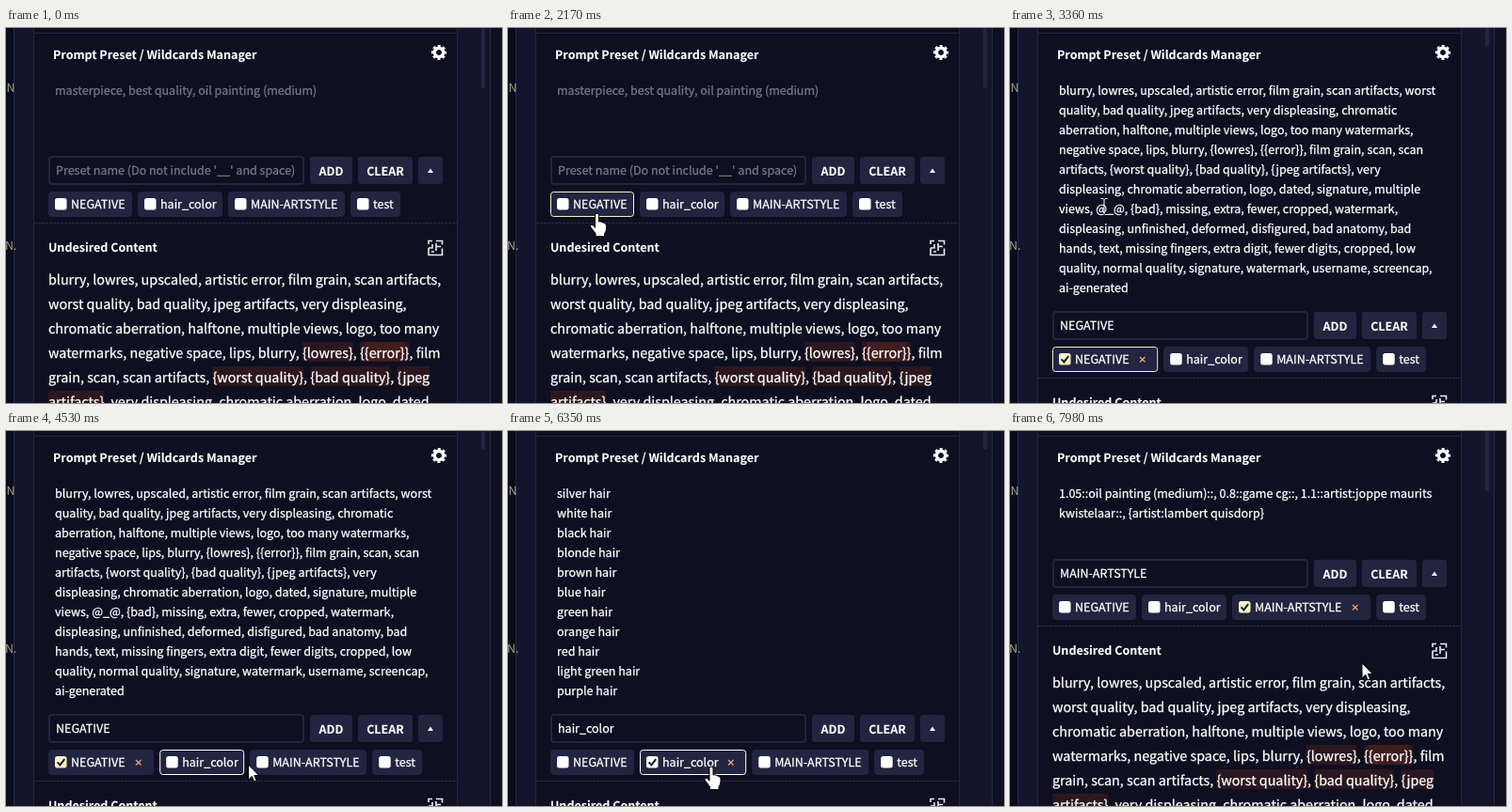
Write an HTML page that moves like this. It is 527x399 px and loops after 8 s.

```html
<!DOCTYPE html>
<html lang="en">
<head>
<meta charset="utf-8">
<title>Preset manager</title>
<style>
  html, body { margin: 0; width: 100%; height: 100%; overflow: hidden; background: #0e0f21; }
  svg { display: block; width: 527px; height: 399px; }
  text {
    font: 12.52px "Noto Sans CJK SC", "Noto Sans CJK JP", "Noto Sans CJK KR", "Open Sans", sans-serif;
    color: #fff; fill: currentColor; stroke: currentColor; stroke-width: 0.28px;
    text-rendering: geometricPrecision; white-space: pre;
  }
  .head { font-weight: 700; stroke-width: 0.1px; }
  .body { font-size: 14.32px; }
  .hint { color: #777885; }
  .side { color: #a3a18c; stroke: none; }
</style>
</head>
<body>
<svg id="stage" viewBox="0 0 527 399"></svg>
<script>
const LOOP = 8000, STEP = 70, CREAM = '#f5f3c2', LINE = '#22253f', PAPER = '#0e0f21';
const stage = document.getElementById('stage');

function el(tag, attrs, parent = stage) {
  const node = document.createElementNS('http://www.w3.org/2000/svg', tag);
  set(node, attrs);
  parent.append(node);
  return node;
}
function set(node, attrs) {
  for (const key in attrs) node.setAttribute(key, attrs[key]);
}
function rect(x, y, width, height, fill, parent, rx = 0) {
  return el('rect', { x, y, width, height, fill, rx }, parent);
}
function text(x, y, str, cls = '', parent = stage) {
  const node = el('text', { x, y, class: cls }, parent);
  node.textContent = str;
  return node;
}
function show(node, on) {
  node.style.display = on ? '' : 'none';
}

// Page frame
rect(0, 0, 527, 399, '#0a0c1a');
rect(8, 0, 507, 399, '#272a45');
rect(9, 0, 505, 399, '#13152c');
rect(515, 0, 12, 399, PAPER);
rect(29, 0, 451, 399, LINE);
rect(30, 0, 449, 399, PAPER);
rect(30, 5, 449, 1, LINE);
const thumb = rect(505, 0, 4, 64, LINE, stage, 2);
text(0.5, 68, 'N', 'side');
text(-1, 236, 'N.', 'side');

text(50, 33, 'Prompt Preset / Wildcards Manager', 'head');
const gear = el('g', { transform: 'translate(460 26)', fill: 'none', stroke: '#fff' });
el('circle', { r: 4.7, 'stroke-width': 3.4 }, gear);
el('circle', { r: 6.8, 'stroke-width': 2.6, 'stroke-dasharray': '2.9 2.44', 'stroke-dashoffset': 1.45 }, gear);

// Prompt contents for each preset
const hairs = 'silver,white,black,blonde,brown,blue,green,orange,red,light green,purple';
const rows = {
  none: ['masterpiece, best quality, oil painting (medium)'],
  NEGATIVE: [
    'blurry, lowres, upscaled, artistic error, film grain, scan artifacts, worst',
    'quality, bad quality, jpeg artifacts, very displeasing, chromatic',
    'aberration, halftone, multiple views, logo, too many watermarks,',
    'negative space, lips, blurry, {lowres}, {{error}}, film grain, scan, scan',
    'artifacts, {worst quality}, {bad quality}, {jpeg artifacts}, very',
    'displeasing, chromatic aberration, logo, dated, signature, multiple',
    'views, @_@, {bad}, missing, extra, fewer, cropped, watermark,',
    'displeasing, unfinished, deformed, disfigured, bad anatomy, bad',
    'hands, text, missing fingers, extra digit, fewer digits, cropped, low',
    'quality, normal quality, signature, watermark, username, screencap,',
    'ai-generated'
  ],
  hair_color: hairs.split(',').map(c => c + ' hair'),
  'MAIN-ARTSTYLE': [
    '1.05::oil painting (medium)::, 0.8::game cg::, 1.1::artist:joppe maurits',
    'kwistelaar::, {artist:lambert quisdorp}'
  ]
};
const ROW = 21, MIN_AREA = 66;
const prompts = {};
for (const name in rows) {
  prompts[name] = el('g', {});
  rows[name].forEach((row, i) => text(52, 71 + ROW * i, row, name === 'none' ? 'hint' : '', prompts[name]));
}

// Everything below the prompt moves down when it grows
const lower = el('g', {});
set(rect(46, 137, 270, 29, PAPER, lower, 3), { stroke: LINE, 'stroke-width': 2 });
const field = text(53, 156.3, '', '', lower);
[[323, 45, 'ADD'], [374, 58, 'CLEAR'], [438, 26, '']].forEach(([x, w, label]) => {
  rect(x, 137, w, 29, LINE, lower, 3);
  set(text(x + w / 2, 156.5, label, 'head', lower), { 'text-anchor': 'middle' });
});
el('path', { d: 'M448 154l3-4.5 3 4.5z', fill: '#fff' }, lower);
el('path', { d: 'M30 207.5H479', stroke: '#2b2e4b', 'stroke-dasharray': '3 1' }, lower);

text(45, 238, 'Undesired Content', 'head', lower);
el('path', {
  d: 'M449 230v-3.5h4M457 226.5h6.5v4M449 234v7.5h14.5v-7M453 230v4h-4M457 237v-4.5h5M457 229v3.5M452 238h3',
  fill: 'none', stroke: '#e8e8ee', 'stroke-width': 1.6
}, lower);

// Body text, with a tint behind every braced part
function tint(line, y, from, to) {
  const x = line.getStartPositionOfChar(from).x;
  const bar = rect(x, y - 17, line.getEndPositionOfChar(to - 1).x - x, 21, '#6b2a1c', undefined, 1);
  bar.setAttribute('opacity', 0.32);
  lower.insertBefore(bar, line);
}
[
  'blurry, lowres, upscaled, artistic error, film grain, scan artifacts,',
  'worst quality, bad quality, jpeg artifacts, very displeasing,',
  'chromatic aberration, halftone, multiple views, logo, too many',
  'watermarks, negative space, lips, blurry, {lowres}, {{error}}, film',
  'grain, scan, scan artifacts, {worst quality}, {bad quality}, {jpeg',
  'artifacts}, very displeasing, chromatic aberration, logo, dated,'
].forEach((row, i) => {
  const y = 273 + 26 * i;
  const line = text(45, y, row, 'body', lower);
  for (const { 0: part, index } of row.matchAll(/\{+[\w ]+\}*|^\w+\}/g)) {
    tint(line, y, index, index + part.length);
    if (part.startsWith('{{')) tint(line, y, index + 1, index + part.length - 1);
  }
});

// Preset chips
const EXTRA = 23.2;
const chips = Object.entries({ NEGATIVE: 89, hair_color: 90, 'MAIN-ARTSTYLE': 124, test: 53 }).map(([name, w]) => {
  const group = el('g', {}, lower);
  const back = el('rect', { x: 0.5, y: 174.5, height: 26, rx: 3, fill: LINE }, group);
  const box = rect(7, 181, 12.5, 12.5, '#fff', group, 2.5);
  const check = el('path', { d: 'M9.6 187.4l2.8 3 4.8-6.2', fill: 'none', stroke: '#15172e', 'stroke-width': 2 }, group);
  text(24, 192, name, '', group);
  const cross = el('path', { d: `M${w + 4} 185l5.5 5.5m0-5.5l-5.5 5.5`, stroke: '#f0a070', 'stroke-width': 1.3 }, group);
  return { name, w, group, back, box, check, cross, accent: name === 'hair_color' ? '#fff' : CREAM };
});

// Pointer
const spot = el('circle', { r: 11.5, fill: '#ffee00', opacity: 0.5 });
const pointer = el('g', { fill: '#fff', stroke: '#000', 'stroke-linejoin': 'round' });
const shapes = {
  hand: el('path', {
    d: 'M-2 2q0-2 2-2t2 2v7q.9-.7 2.2 0q1.2-.2 2 .9q1.5-.2 2.3 1.2q1.5.2 1.5 2v3q0 3-2 5.5v3h-9.5v-3l-5-6.5q-1.2-2 .6-2.8q1.6-.3 2.4 1.2l1.5 1.7z'
  }, pointer),
  arrow: el('path', { d: 'M0 0v16l3.8-3.6 2.4 5.6 2.5-1-2.4-5.5h5z' }, pointer),
  beam: el('path', { d: 'M-3.5-8.5h2.5l1 1 1-1h2.5M0-7.5v15M-3.5 8.5h2.5l1-1 1 1h2.5', fill: 'none', stroke: '#fff' }, pointer)
};

// Each glide: start, end, where it arrives
const START = [486, 420];
const glides = [
  [460, 1090, 243, 144],
  [1220, 1570, 290, 198],
  [1570, 1980, 86, 198],
  [2170, 2730, 285, 179],
  [2730, 3010, 100, 190],
  [3430, 3840, 245, 260],
  [3970, 4390, 215, 352],
  [4390, 4810, 300, 358],
  [4810, 5220, 216, 354],
  [6350, 6420, 216, 357],
  [6750, 6960, 311, 344],
  [7710, 7980, 374, 247]
];
const clicks = [[3010, 'NEGATIVE'], [5360, 'hair_color'], [6890, 'MAIN-ARTSTYLE']];
const PRESS = 130, FOCUS = 260;

const smooth = u => u * u * (3 - 2 * u);

function pointerAt(t) {
  let [x, y] = START;
  for (const [from, to, endX, endY] of glides) {
    if (t < from) break;
    const steps = Math.floor((t - from) / STEP) + 1;
    const u = smooth(Math.min(1, steps * STEP / (to - from)));
    x += (endX - x) * u;
    y += (endY - y) * u;
  }
  return [x, y];
}

function layoutAt(t) {
  const [at, name] = clicks.filter(c => t >= c[0] + PRESS).pop() || [-LOOP, 'none'];
  let x = 45;
  const spans = chips.map(chip => {
    const span = { name: chip.name, x, w: chip.w + (chip.name === name ? EXTRA : 0) };
    x += span.w + 6;
    return span;
  });
  return { name, spans, since: t - at - PRESS, drop: Math.max(0, rows[name].length * ROW - MIN_AREA) };
}

function chipUnder([x, y], { spans, drop }) {
  if (y < 174 + drop || y > 201 + drop) return '';
  const hit = spans.find(s => x >= s.x && x <= s.x + s.w);
  return hit ? hit.name : '';
}

function pointerKind([x, y], layout) {
  const top = y - layout.drop;
  if (chipUnder([x, y], layout)) return 'hand';
  if (top > 136 && top < 167 && x > 322 && x < 465) return 'hand';
  if (x > 44 && x < 465 && y > 50 && top < 167) return 'beam';
  return 'arrow';
}

function draw(t) {
  const layout = layoutAt(t), pos = pointerAt(t);
  const { name, spans, drop } = layout;
  const over = chipUnder(pos, layout);
  // The outline trails the pointer by one step
  const lit = layout.since < FOCUS ? name : chipUnder(pointerAt(t - STEP), layoutAt(t - STEP));

  for (const key in prompts) show(prompts[key], key === name);
  set(lower, { transform: `translate(0 ${drop})` });
  set(thumb, { height: drop ? 20 : 64 });
  field.textContent = name === 'none' ? "Preset name (Do not include '__' and space)" : name;
  set(field, { class: name === 'none' ? 'hint' : '' });

  chips.forEach((chip, i) => {
    const on = chip.name === name;
    set(chip.group, { transform: `translate(${spans[i].x} 0)` });
    set(chip.back, {
      width: spans[i].w - 1,
      stroke: chip.name === lit ? chip.accent : chip.name === over ? '#454861' : LINE
    });
    set(chip.box, { fill: on ? chip.accent : '#fff' });
    show(chip.check, on);
    show(chip.cross, on);
  });

  const kind = pointerKind(pos, layout);
  for (const key in shapes) show(shapes[key], key === kind);
  set(pointer, { transform: `translate(${pos})` });
  set(spot, { cx: pos[0] - 2, cy: pos[1] - 1 });
  show(spot, clicks.some(([at]) => t >= at && t < at + PRESS));
}

function tick() {
  draw(performance.now() % LOOP);
  requestAnimationFrame(tick);
}
tick();
</script>
</body>
</html>
```
